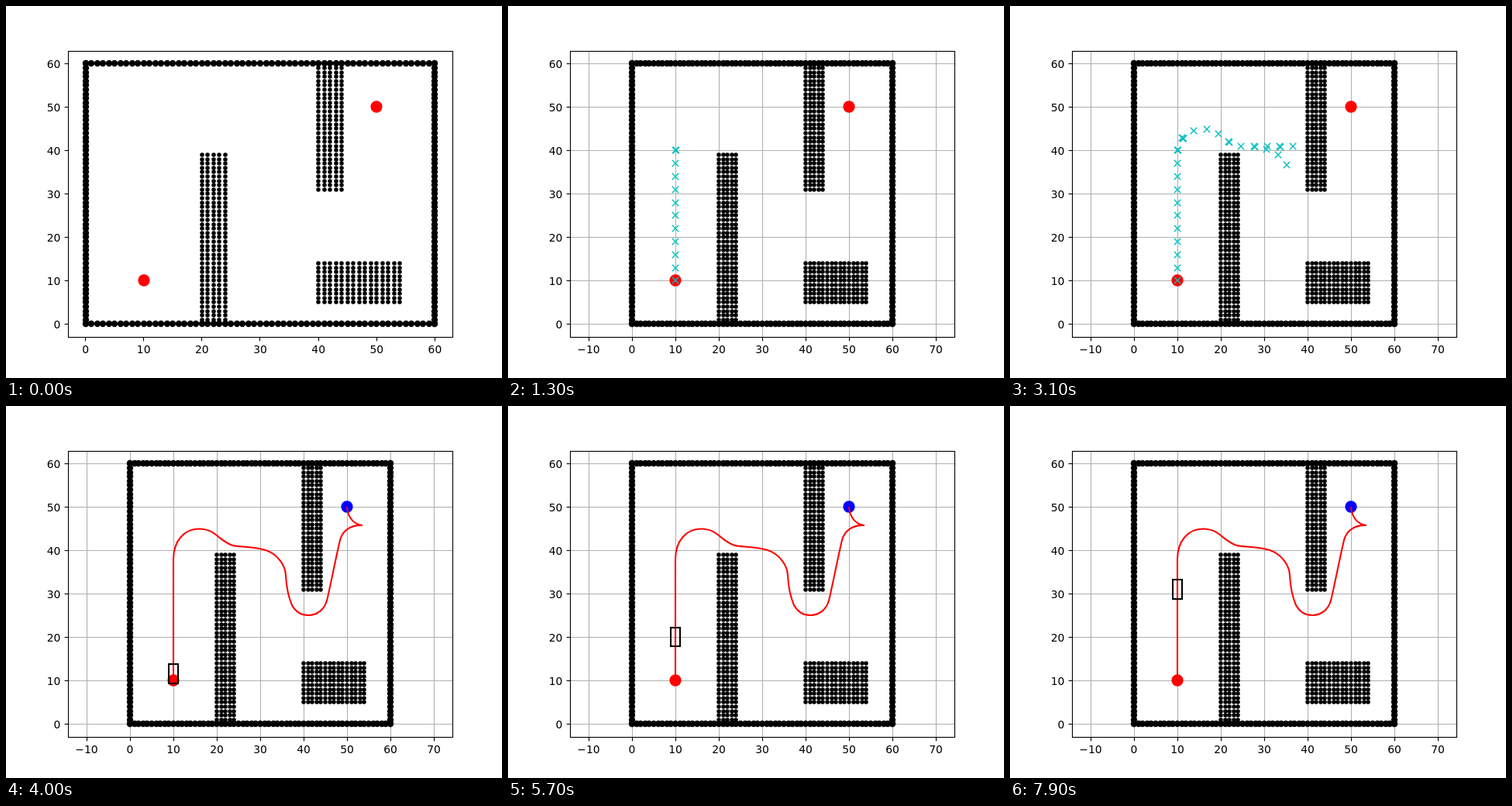
Animation, 640 px wide and 480 px high, one loop 8000 ms. Source, as an HTML page with a canvas:

```html
<!DOCTYPE html>
<html>
<head>
<meta charset="utf-8">
<style>
html, body { margin: 0; width: 100%; height: 100%; overflow: hidden; background: #fff; }
canvas { display: block; }
</style>
</head>
<body>
<canvas id="stage" width="640" height="480"></canvas>
<script>
const ctx = document.getElementById('stage').getContext('2d');
const LOOP = 8000, STEP = 100, THIN = 1.11, THICK = 2.08;
const PATH_START = 38, CAR_START = 39;

const route = new Path2D('M216 354V198C216 174 230 158.5 249 158.5' +
  'C271 158.5 275 175 293 180C300 182 318 181 335 186' +
  'C351 191 361 207 361 219C362 236 366 250 369 257' +
  'C374 266 382 270 390 270C402 270 411 262 414 251' +
  'C417 240 424 203 431 173C434 161 445 153 460 154' +
  'C449 153 441 144 440 130');

// Search nodes in the order they are expanded, in pixels
const nodes = [];
for (let y = 10; y <= 40; y += 3) nodes.push([216, Math.round(410.4 - 5.6 * y)]);
nodes.push([217, 186], [222, 170], [223, 171], [224, 171], [237, 161], [254, 159],
  [269, 165], [282, 175], [283, 176], [298, 181], [315, 181], [316, 182],
  [332, 181], [348, 181], [349, 182], [365, 181], [331, 185], [346, 192],
  [357, 205], [361, 221], [362, 222], [363, 238], [363, 239], [366, 255], [367, 256]);

let px;
const py = y => 410.4 - 5.6 * y;

function dot(x, y, r, color = '#000') {
  ctx.fillStyle = color;
  ctx.beginPath();
  ctx.arc(Math.round(px(x)), Math.round(py(y)), r, 0, 7);
  ctx.fill();
}

function line(x1, y1, x2, y2, color, width) {
  ctx.strokeStyle = color;
  ctx.lineWidth = width;
  ctx.beginPath();
  ctx.moveTo(x1, y1);
  ctx.lineTo(x2, y2);
  ctx.stroke();
}

function block(x1, x2, y1, y2) {
  for (let x = x1; x <= x2; x++)
    for (let y = y1; y <= y2; y++) dot(x, y, 2.78);
}

function axes(first, last, grid) {
  const snap = v => Math.floor(v) + 0.5;
  ctx.font = '13.89px "DejaVu Sans", sans-serif';
  ctx.fillStyle = '#000';
  ctx.textAlign = 'center';
  for (let v = first; v <= last; v += 10) {
    const x = snap(px(v));
    if (grid) line(x, 58, x, 427, '#b0b0b0', THIN);
    line(x, 427.5, x, 432.4, '#000', THIN);
    ctx.fillText(String(v).replace('-', '\u2212'), px(v), 448);
  }
  ctx.textAlign = 'right';
  for (let v = 0; v <= 60; v += 10) {
    const y = snap(py(v));
    if (grid) line(80, y, 576, y, '#b0b0b0', THIN);
    line(75.6, y, 80.5, y, '#000', THIN);
    ctx.fillText(v, 70.3, Math.round(py(v) + 5.3));
  }
}

function walls() {
  block(20, 24, 0, 39);
  block(40, 44, 31, 60);
  block(40, 54, 5, 14);
  for (let i = 0; i <= 60; i++) {
    dot(i, 0, 4.17);
    dot(i, 60, 4.17);
    dot(0, i, 4.17);
    dot(60, i, 4.17);
  }
}

function cross([x, y]) {
  const r = 4.17;
  line(x - r, y - r, x + r, y + r, '#00bfbf', 1.39);
  line(x - r, y + r, x + r, y - r, '#00bfbf', 1.39);
}

function car(y) {
  const top = Math.round(py(y + 3.25)), bottom = Math.round(py(y - 1.1));
  ctx.strokeStyle = '#000';
  ctx.lineWidth = THICK;
  ctx.strokeRect(210, top, 12, bottom - top);
}

function draw(tick) {
  const intro = tick === 0, solved = tick >= PATH_START;
  px = intro ? x => 102.545 + 7.515 * x : x => 160 + 5.6 * x;
  ctx.fillStyle = '#fff';
  ctx.fillRect(0, 0, 640, 480);
  axes(intro ? 0 : -10, intro ? 60 : 70, !intro);
  walls();
  if (intro) line(178, 346, 178, 350, '#777', 1.2);
  dot(10, 10, 7.64, '#f00');
  dot(50, 50, 7.64, solved ? '#00f' : '#f00');
  if (solved) {
    ctx.strokeStyle = '#f00';
    ctx.lineWidth = THICK;
    ctx.stroke(route);
    if (tick >= CAR_START) car(10 + (tick - CAR_START) * 0.5);
  } else {
    nodes.slice(0, Math.max(0, tick - 1)).forEach(cross);
  }
  ctx.strokeStyle = '#000';
  ctx.lineWidth = THIN;
  ctx.strokeRect(80.5, 58.5, 496, 369);
}

let shown = -1;
function frame() {
  const tick = Math.floor(performance.now() % LOOP / STEP);
  if (tick !== shown) draw(shown = tick);
  requestAnimationFrame(frame);
}
frame();
</script>
</body>
</html>
```
